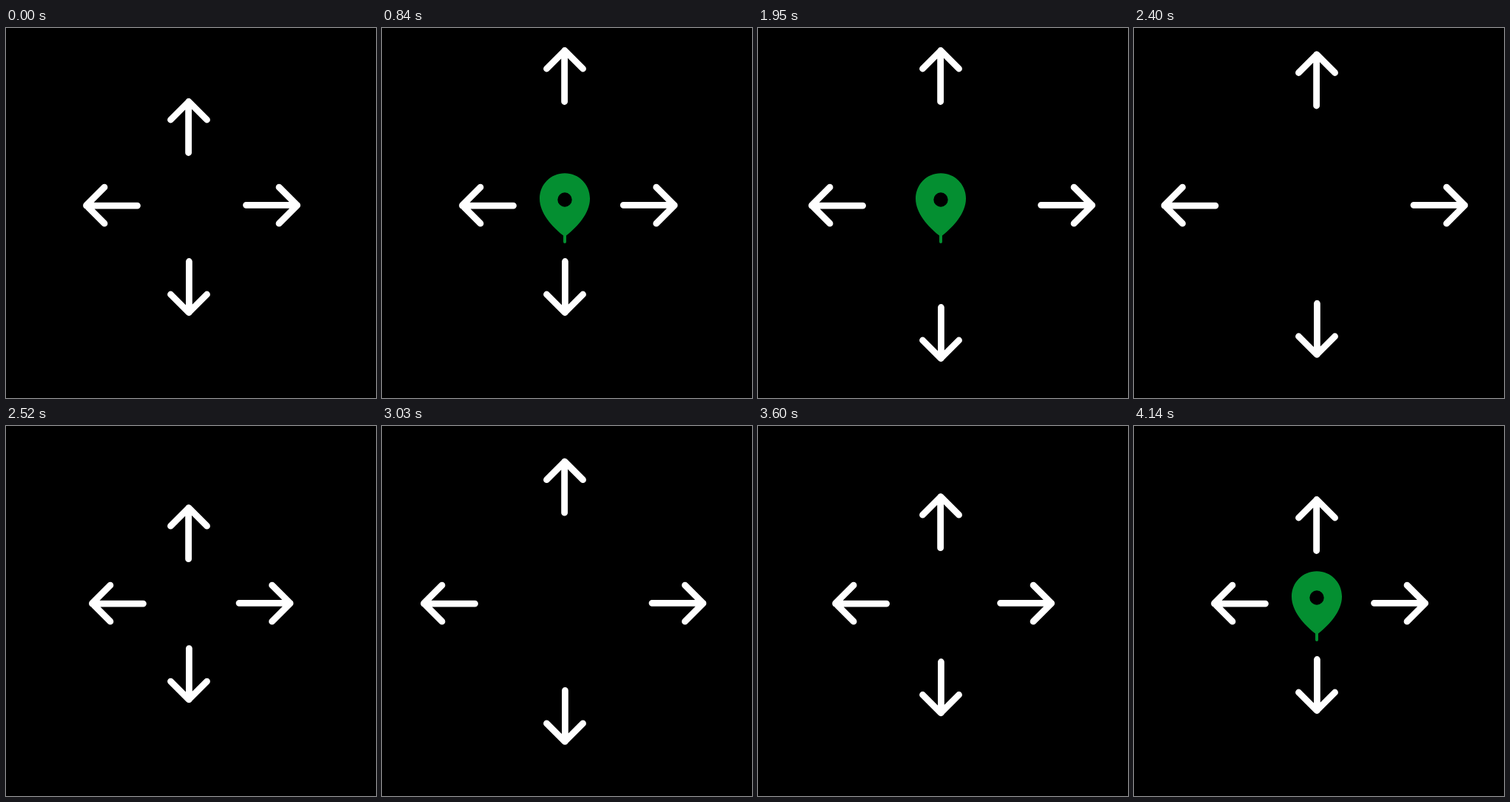
An HTML page that plays this animation: 500x500 px, repeating every 4.37 s.

```html
<!DOCTYPE html>
<html lang="en">
<head>
<meta charset="utf-8">
<title>Pin and arrows</title>
<style>
  html, body { margin: 0; width: 100%; height: 100%; overflow: hidden; background: #000; }
  svg { display: block; width: 100%; height: 100%; }
  .arrow { fill: none; stroke: #fff; stroke-width: 8.8; stroke-linecap: round; stroke-linejoin: round; }
</style>
</head>
<body>
<svg viewBox="0 0 500 500">
  <g id="pin">
    <path fill="#048f31" fill-rule="evenodd" d="M247 196.3C266 196.3 281 211.5 281 230.5C281 250 264.5 268.5 249 280.5V289A2 2 0 0 1 245 289V280.5C229.5 268.5 213 250 213 230.5C213 211.5 228 196.3 247 196.3ZM237.3 232A9.7 9.7 0 0 0 256.7 232A9.7 9.7 0 0 0 237.3 232Z"/>
  </g>
  <g id="arrows"></g>
</svg>
<script>
const LOOP = 4370, STEP = 30;

// Tip position, heading, and outward offsets: out, pulled in, out again.
const arrows = [
  { x: 247, y: 99.5, dx: 0, dy: -1, out: 69, inner: -32, far: 73 },
  { x: 393.5, y: 239.7, dx: 1, dy: 0, out: 58, inner: -27, far: 58 },
  { x: 247, y: 384.5, dx: 0, dy: 1, out: 62, inner: -35, far: 62 },
  { x: 108.5, y: 239.7, dx: -1, dy: 0, out: 73, inner: -29, far: 73 }
];

// Each move: start, duration, and the time it settles.
const solo = [[317, 285, 570], [827, 285, 1080], [1344, 300, 1620], [1858, 318, 2130]];
const pullIn = [2380, 285, 2640];
const pushOut = [2890, 285, 3150];
const goHome = [3396, 285, 3660];

const pin = document.getElementById("pin");
const layer = document.getElementById("arrows");

for (const a of arrows) {
  a.el = document.createElementNS("http://www.w3.org/2000/svg", "path");
  a.el.setAttribute("class", "arrow");
  a.el.setAttribute("d", "M-69 -.4H0M-24.5 -24.5L0 0L-24.5 24.5");
  a.angle = Math.atan2(a.dy, a.dx) * 180 / Math.PI;
  layer.appendChild(a.el);
}

const bezier = (p, q, s) => 3 * p * s * (1 - s) ** 2 + 3 * q * s * s * (1 - s) + s ** 3;

// Equivalent to cubic-bezier(.25, .1, .25, 1).
function ease(x) {
  let lo = 0, hi = 1;
  for (let i = 0; i < 24; i++) {
    const mid = (lo + hi) / 2;
    if (bezier(0.25, 0.25, mid) < x) lo = mid; else hi = mid;
  }
  return bezier(0.1, 1, lo);
}

function progress(t, [start, duration, end]) {
  if (t <= start) return 0;
  return t >= end ? 1 : ease(Math.min(1, (t - start) / duration));
}

function pinOpacity(t) {
  if (t < 60) return 0;
  if (t < 90) return 0.5;
  return t < 2400 || t >= 4140 ? 1 : 0;
}

function draw(time) {
  const t = Math.floor((time % LOOP) / STEP + 0.001) * STEP;
  const pulled = progress(t, pullIn);
  const pushed = progress(t, pushOut);
  const home = progress(t, goHome);
  arrows.forEach((a, i) => {
    const d = a.out * progress(t, solo[i])
      + (a.inner - a.out) * pulled
      + (a.far - a.inner) * pushed
      - a.far * home;
    a.el.setAttribute("transform",
      `translate(${a.x + a.dx * d} ${a.y + a.dy * d}) rotate(${a.angle})`);
  });
  pin.setAttribute("opacity", pinOpacity(t));
}

let origin;
function tick(now) {
  origin ??= now;
  draw(now - origin);
  requestAnimationFrame(tick);
}
draw(0);
requestAnimationFrame(tick);
</script>
</body>
</html>
```
